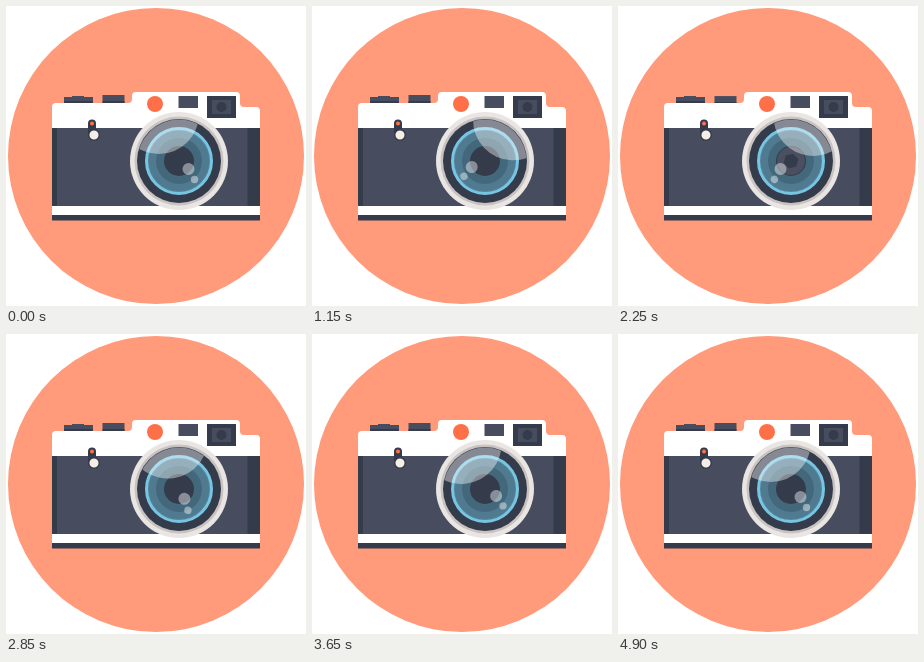
Recreate the animation shown at these times as an HTML page. Size 300 by 300 pixels, loop 5000 ms.

```html
<!DOCTYPE html>
<html lang="en">
<head>
<meta charset="utf-8">
<title>Camera</title>
<style>
html, body { margin: 0; width: 100%; height: 100%; overflow: hidden; background: #fff; }
svg { display: block; width: 100%; height: 100%; }
</style>
</head>
<body>
<svg viewBox="0 0 300 300">
  <defs>
    <clipPath id="glass"><circle cx="173" cy="155" r="41.5"/></clipPath>
  </defs>
  <circle cx="150" cy="150" r="148" fill="#ff9a7b"/>

  <g fill="#474d5e">
    <path d="M58 91H66V90H78V91H87V98H58Z"/>
    <path d="M58 95H87V98H58Z" fill="#343b4b"/>
    <g id="button">
      <path d="M96.500 89H118.500V97H96.500Z"/>
      <path d="M96.500 95H118.500V97H96.500Z" fill="#343b4b"/>
    </g>
  </g>

  <path fill="#fff" d="M46 123V101q0-4 4-4H122q4 0 4-4V90q0-4 4-4H230q4 0 4 4V97q0 4 4 4H250q4 0 4 4V123Z"/>
  <rect x="46" y="122" width="208" height="78" fill="#474d5e"/>
  <g fill="#343b4b">
    <rect x="46" y="122" width="5" height="78"/>
    <rect x="241.500" y="122" width="12.500" height="78"/>
  </g>
  <rect x="46" y="200" width="208" height="9" fill="#fff"/>
  <rect x="46" y="209" width="208" height="5.500" fill="#343b4b"/>

  <circle cx="149" cy="98" r="8" fill="#ff7049"/>
  <rect x="172.500" y="90" width="19.500" height="12" fill="#474d5e"/>
  <rect x="201" y="90" width="29" height="22" fill="#343b4b"/>
  <rect x="206" y="94" width="19" height="14" fill="#474d5e"/>
  <circle cx="215.500" cy="101" r="5" fill="#343b4b"/>

  <rect x="82" y="113.500" width="8" height="16" rx="4" fill="#343b4b"/>
  <circle cx="86" cy="117.500" r="2" fill="#ff7049"/>
  <circle cx="88" cy="129" r="5.300" fill="#f6efe8" stroke="#343b4b" stroke-width="1.500"/>

  <g transform="translate(173 155)">
    <circle r="49" fill="#e9e5e3"/>
    <circle r="44.500" fill="#c8c2c1"/>
    <circle r="42" fill="#343b4b"/>
    <circle r="32.500" fill="#57849a" stroke="#76c5e2" stroke-width="3"/>
    <circle r="30" fill="#4f7a8f"/>
    <circle r="23" fill="#44687b"/>
    <circle r="15" fill="#343b4b"/>
    <path id="blades" fill="#4a5061" fill-rule="evenodd"/>
  </g>

  <g clip-path="url(#glass)" fill="#fff">
    <g id="shine">
      <circle cx="153" cy="108" r="40" opacity=".4"/>
      <circle cx="182.500" cy="163" r="6" opacity=".42"/>
      <circle cx="188.500" cy="173.500" r="3.700" opacity=".42"/>
    </g>
  </g>

  <g id="flash" fill="#fff">
    <circle r="32.500" fill="none" stroke="#fff" stroke-width="2"/>
    <path id="star"/>
    <path d="M27.500-54Q26-43 18.500-33Q20-44 27.500-54Z"/>
    <path d="M-25 54Q-24 43-18.500 33Q-19 44-25 54Z"/>
    <path d="M-46-29Q-38-27-32-20Q-41-22-46-29Z"/>
    <path d="M46 29Q38 27 32 20Q41 22 46 29Z"/>
  </g>
</svg>
<script>
const LOOP = 5000;
const SHOTS = [2000, 4400];
// time and angle of the shine's swing
const SWING = [[0, 0], [780, 75], [1700, 60], [2380, 60], [3180, -14], [4000, 0], [LOOP, 0]];

const el = id => document.getElementById(id);
const button = el('button'), blades = el('blades'), shine = el('shine'), flash = el('flash');

const ramp = (t, a, b) => Math.min(1, Math.max(0, (t - a) / (b - a)));
const ease = (t, a, b) => (1 - Math.cos(Math.PI * ramp(t, a, b))) / 2;
const outCubic = x => 1 - (1 - x) ** 3;
const pulse = (t, a, b, c, d) => ease(t, a, b) - ease(t, c, d);

function polygon(n, radius, turn) {
  let d = '';
  for (let i = 0; i < n; i++) {
    const a = turn + i * 2 * Math.PI / n, r = radius(i);
    d += (i ? 'L' : 'M') + (r * Math.cos(a)).toFixed(2) + ' ' + (r * Math.sin(a)).toFixed(2);
  }
  return d + 'Z';
}

function swing(t) {
  const i = SWING.findIndex(k => k[0] > t);
  const [a, from] = SWING[i - 1], [b, to] = SWING[i];
  return from + (to - from) * ease(t, a, b);
}

function draw(t) {
  shine.setAttribute('transform', `rotate(${swing(t)} 172.500 145.700)`);

  const s = t - (t < 2700 ? SHOTS[0] : SHOTS[1]);
  button.setAttribute('transform', `translate(0 ${5 * pulse(s, -300, -100, 50, 340)})`);

  const shut = pulse(s, -200, -30, 50, 450);
  const hole = 15 * (1 - shut);
  blades.setAttribute('d', shut < 0.01 ? '' :
    'M-14 0A14 14 0 1 0 14 0A14 14 0 1 0-14 0Z' +
    polygon(6, () => hole, 0.3 + shut));

  const grow = outCubic(ramp(s, -150, 0));
  flash.setAttribute('transform', `translate(182 79.500) scale(${grow})`);
  flash.setAttribute('opacity', s < -150 ? 0 : 1 - ramp(s, 0, 150));
}

el('star').setAttribute('d', polygon(8, i => i % 2 ? 11 : i % 4 ? 50 : 53.5, -0.47));

function tick(now) {
  draw(now % LOOP);
  requestAnimationFrame(tick);
}
draw(0);
requestAnimationFrame(tick);
</script>
</body>
</html>
```
